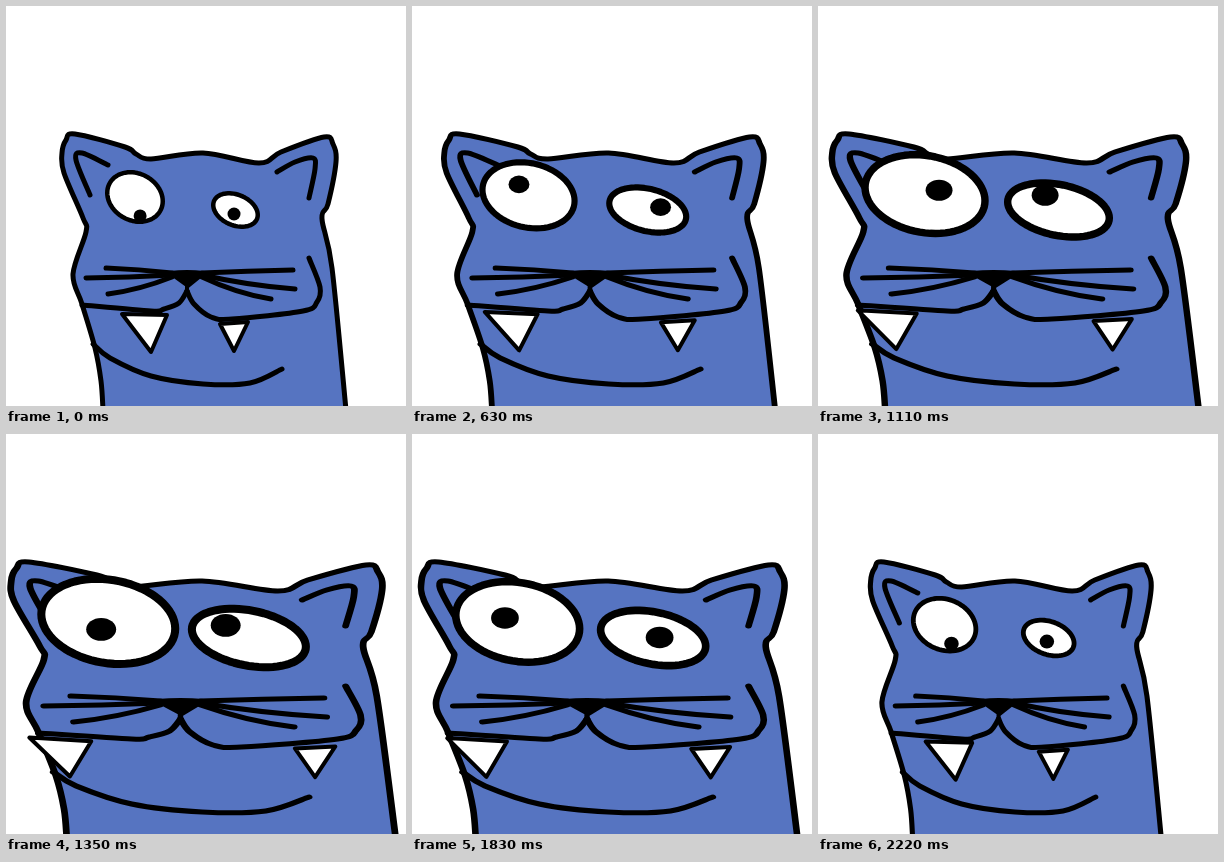
These frames come from a looping animation (400x400 px, 2250 ms). An HTML page:

```html
<!DOCTYPE html>
<html lang="en">
<head>
<meta charset="utf-8">
<title>Blue cat</title>
<style>
html, body { margin: 0; width: 100%; height: 100%; overflow: hidden; background: #fff; }
svg { display: block; width: 100vw; height: 100vh; }
</style>
</head>
<body>
<svg id="stage" viewBox="0 0 400 400" fill="none" stroke="#000" stroke-width="5" stroke-linecap="round" stroke-linejoin="round"></svg>
<script>
const LOOP = 2250, STEP = 30, PEAK = 1680, MID = 199.5;
const BLUE = '#5674c1';
const stage = document.getElementById('stage');

function set(el, attrs) {
  for (const k in attrs) el.setAttribute(k, attrs[k]);
}

function add(tag, attrs, parent = stage) {
  const el = document.createElementNS('http://www.w3.org/2000/svg', tag);
  set(el, attrs);
  return parent.appendChild(el);
}

const mix = (a, b, k) => a + (b - a) * k;

// Smooth open curve through "x,y x,y ..."
function curve(text) {
  const p = text.split(' ').map(s => s.split(',').map(Number));
  let d = 'M' + p[0];
  for (let i = 0; i < p.length - 1; i++) {
    const a = p[i - 1] || p[i], b = p[i], c = p[i + 1], e = p[i + 2] || c;
    const c1 = b.map((v, j) => v + (c[j] - a[j]) / 6);
    const c2 = c.map((v, j) => v - (e[j] - b[j]) / 6);
    d += `C${c1} ${c2} ${c}`;
  }
  return d;
}

// Head, drawn at its narrowest
const head = add('g', {});
const line = (d, attrs) => add('path', { d, ...attrs }, head);

const outline = '97,404 95,375 89,342 76,298 67,268 80,226 77,212 58,167 56,147 60,134 69,128 ' +
  '119,141 130,148 145,153 197,147 253,157 275,146 318,131 327,138 330,156 322,198 316,213 326,262 340,404';
line(curve(outline), { fill: BLUE });

const features = {
  leftEar: '84,189 70,154 76,147 102,159',
  rightEar: '271,166 289,156 307,152 309,163 303,192',
  leftLip: '76,299 145,305 158,303 173,297 181,285',
  rightLip: '181,285 188,298 205,311 226,313 297,305 311,296 314,281 303,252',
  chin: '87,338 104,352 145,370 197,378 244,377 276,363'
};
Object.values(features).forEach(pts => line(curve(pts)));
line('M164 267Q181 265 198 267L182 280Z M181 278V285', { fill: '#000', 'stroke-width': 4 });

function whiskers(root, tips) {
  tips.forEach(([x, y], i) => {
    const start = 267 + 2 * i;
    line(`M${root} ${start}Q${mix(root, x, .5)} ${mix(start, y, .75)} ${x} ${y}`);
  });
}
whiskers(166, [[100, 262], [80, 272], [102, 288]]);
whiskers(196, [[287, 264], [289, 283], [265, 293]]);

// Eyes: outer box [left, top, right, bottom] at rest and at full size, tilt,
// and where the pupil looks at each of the times, in half boxes
const LOOK = [0, 390, 870, 1350, 1650, 1980];
const eyes = [
  {
    from: [99, 164, 159, 218], to: [23, 138, 175, 236], tilt: .17,
    look: [[.17, .7], [-.67, -.14], [.33, -.29], [-.1, .17], [-.58, .33], [.17, -.31]]
  },
  {
    from: [205, 185, 254, 223], to: [179, 169, 310, 239], tilt: .3,
    look: [[-.06, .21], [.5, .19], [0, -.4], [-.38, -.38], [0, .31], [.14, -.29]]
  }
];
for (const e of eyes) {
  e.white = add('polygon', { fill: '#fff' });
  e.pupil = add('ellipse', { fill: '#000', stroke: 'none' });
}

// Teeth: three corners, at rest and at full spread
const teeth = [
  { from: [116, 308, 161, 309, 145, 346], to: [12, 303, 76, 307, 54, 342] },
  { from: [214, 318, 242, 316, 228, 345], to: [298, 314, 340, 312, 319, 343] }
];
for (const t of teeth) t.el = add('polygon', { fill: '#fff', 'stroke-width': 4 });

// Smooth looping path through the look points
function gaze(look, t) {
  const n = LOOK.length;
  const key = i => {
    const m = (i + n) % n;
    return { t: LOOK[m] + Math.floor(i / n) * LOOP, p: look[m] };
  };
  let i = n - 1;
  while (LOOK[i] > t) i--;
  const [a, b, c, d] = [i - 1, i, i + 1, i + 2].map(key);
  const span = c.t - b.t, s = (t - b.t) / span, ease = s * s * (3 - 2 * s);
  return [0, 1].map(j => {
    const m0 = (c.p[j] - a.p[j]) / (c.t - a.t) * span;
    const m1 = (d.p[j] - b.p[j]) / (d.t - b.t) * span;
    return mix(b.p[j], c.p[j], ease) + s * (1 - s) * ((1 - s) * m0 - s * m1);
  });
}

function drawEye(e, t, k) {
  const [l, top, r, bottom] = e.from.map((v, i) => mix(v, e.to[i], k));
  const cx = (l + r) / 2, cy = (top + bottom) / 2;
  const hx = (r - l) / 2, hy = (bottom - top) / 2;
  const pen = mix(4.5, 8.5, k);
  const points = Array.from({ length: 72 }, (_, i) => {
    const a = i * Math.PI / 36;
    return [cx + (hx - pen / 2) * Math.cos(a), cy + (hy - pen / 2) * Math.sin(a + e.tilt)];
  });
  set(e.white, { points: points.join(' '), 'stroke-width': pen });
  const [px, py] = gaze(e.look, t);
  set(e.pupil, { cx: cx + px * hx, cy: cy + py * hy, rx: mix(6.5, 16, k), ry: mix(6.5, 12, k) });
}

function draw(ms) {
  const t = Math.floor((ms % LOOP) / STEP) * STEP;
  const u = t < PEAK ? t / PEAK : (LOOP - t) / (LOOP - PEAK);
  const spread = Math.min(1, t / 1515, (2265 - t) / 560);
  const wide = 1 + .44 * u;
  set(head, { transform: `translate(${MID * (1 - wide)} 0) scale(${wide} 1)` });
  for (const e of eyes) drawEye(e, t, spread);
  for (const k of teeth) {
    set(k.el, { points: k.from.map((v, i) => mix(v, k.to[i], spread)).join(' ') });
  }
}

function tick() {
  draw(performance.now());
  requestAnimationFrame(tick);
}
tick();
</script>
</body>
</html>
```
